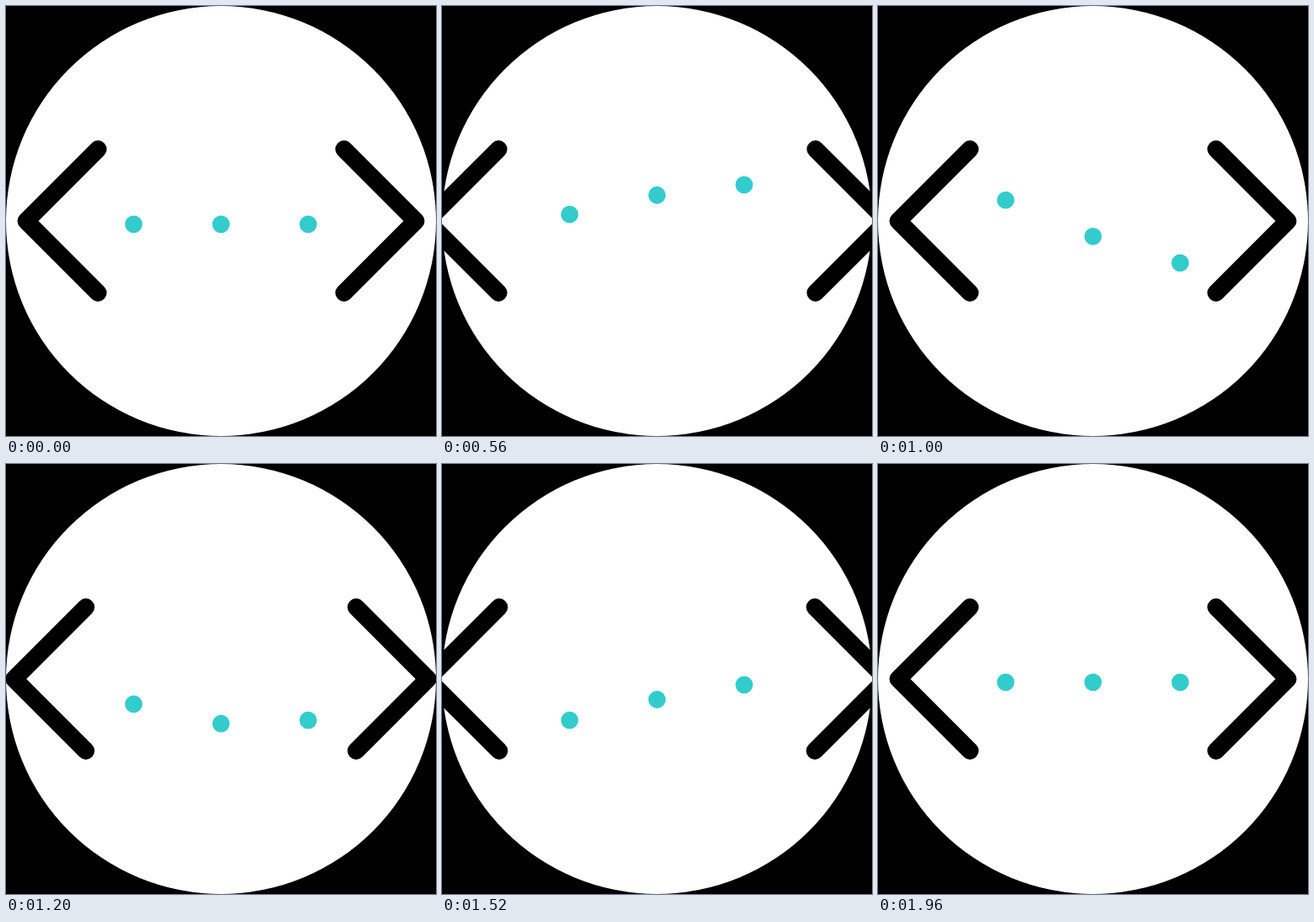
Animation of 512 by 512 pixels, one loop 2000 ms. Source, as an HTML page:

```html
<!DOCTYPE html>
<html lang="en">
<head>
<meta charset="utf-8">
<title>Code brackets</title>
<style>
  html, body { margin: 0; width: 100%; height: 100%; overflow: hidden; background: #000; }
  svg { display: block; width: 100%; height: 100%; }
</style>
</head>
<body>
<svg viewBox="0 0 512 512">
  <circle cx="256" cy="256" r="256" fill="#fff"/>
  <g fill="none" stroke="#000" stroke-width="20.8" stroke-linecap="round" stroke-linejoin="round">
    <path id="left" d="M109.5 170.5 24 256l85.5 85.5"/>
    <path id="right" d="M402.5 170.5 488 256l-85.5 85.5"/>
  </g>
  <g fill="#33cccc">
    <circle class="dot" cx="152" cy="259.8" r="10.4"/>
    <circle class="dot" cx="256" cy="259.8" r="10.4"/>
    <circle class="dot" cx="359.8" cy="259.8" r="10.4"/>
  </g>
</svg>
<script>
const LOOP = 2000, STEP = 40, DOT_LAG = 160, REST_Y = 259.8;
const left = document.getElementById('left');
const right = document.getElementById('right');
const dots = [...document.querySelectorAll('.dot')];

// Height of the leading dot over time: [ms, offset]
const wave = [
  [60, 0], [160, -2.7], [320, -23], [480, -44], [545, -47.5], [640, -36.4], [800, 2.6],
  [880, 26], [1040, 49.3], [1110, 50.8], [1200, 45.3], [1360, 20.7], [1520, 3], [1640, 0]
];

const smooth = u => {
  const c = Math.min(1, Math.max(0, u));
  return c * c * (3 - 2 * c);
};

function slopeAt(keys, i) {
  if (i === 0 || i === keys.length - 1) return 0;
  const [[t0, y0], [t1, y1], [t2, y2]] = keys.slice(i - 1, i + 2);
  const a = t1 - t0, b = t2 - t1;
  return ((y1 - y0) / a * b + (y2 - y1) / b * a) / (a + b);
}

// Cubic Hermite curve through the keys
function curve(keys, t) {
  const i = keys.findIndex(k => k[0] > t) - 1;
  if (i < 0) return 0;
  const [t0, y0] = keys[i], [t1, y1] = keys[i + 1];
  const d = t1 - t0, u = (t - t0) / d, v = 1 - u;
  return y0 + (y1 - y0) * smooth(u)
    + d * u * v * (v * slopeAt(keys, i) - u * slopeAt(keys, i + 1));
}

// Brackets push outwards quickly and return more slowly
const push = (t, start) => 45 * (smooth((t - start) / 376) - smooth((t - start - 376) / 500));

function draw(t) {
  const shift = push(t, 108) + push(t, 1058);
  left.setAttribute('transform', `translate(${-shift} 0)`);
  right.setAttribute('transform', `translate(${shift} 0)`);
  dots.forEach((dot, i) => dot.setAttribute('cy', REST_Y + curve(wave, t - (2 - i) * DOT_LAG)));
}

const begin = performance.now();
function tick() {
  const t = (performance.now() - begin) % LOOP;
  draw(Math.floor(t / STEP) * STEP);
  requestAnimationFrame(tick);
}
tick();
</script>
</body>
</html>
```
